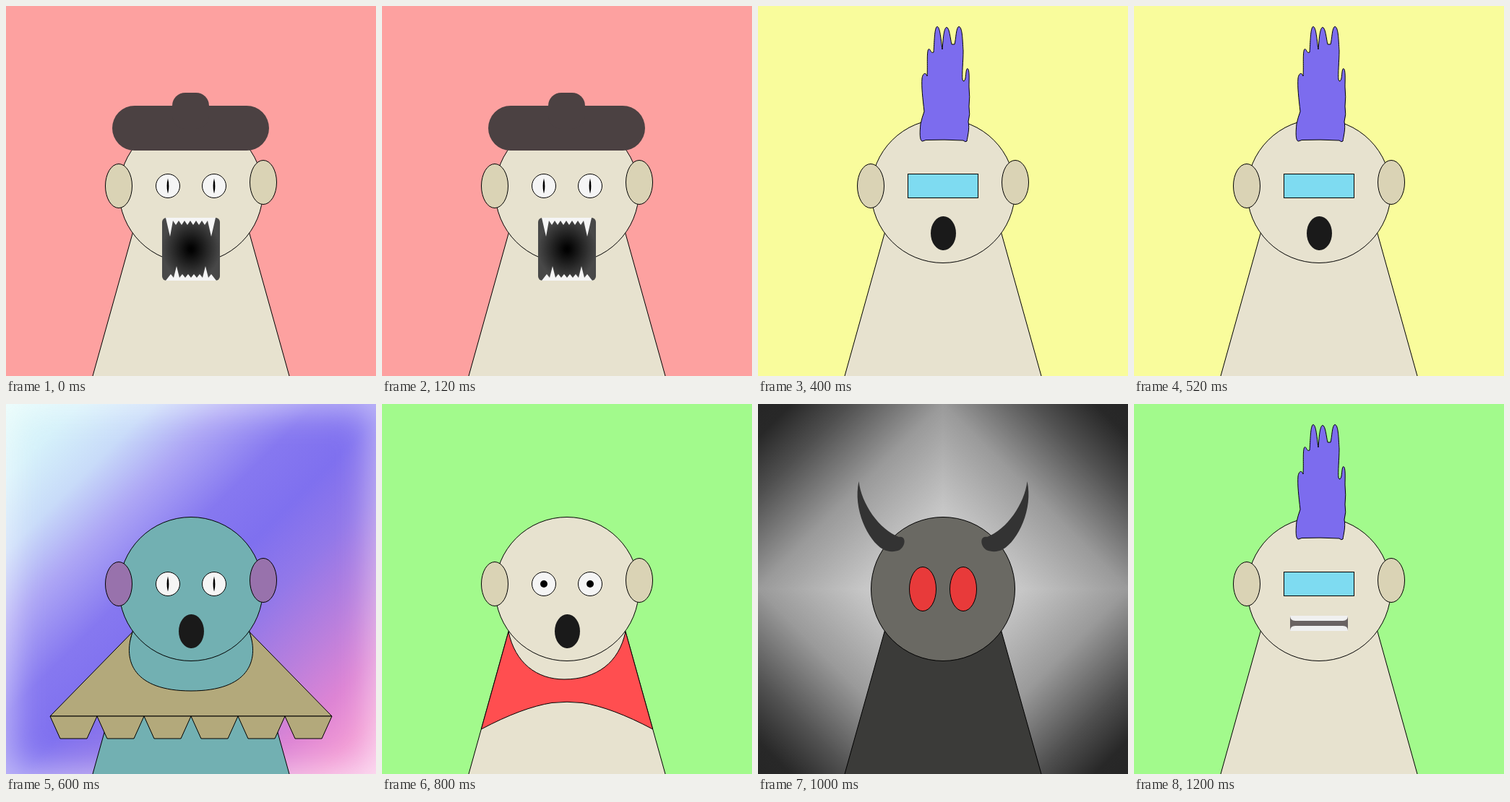
An HTML page for the animation above (1400 ms loop, 512 px wide and 512 px high).

```html
<!DOCTYPE html>
<html lang="en">
<head>
<meta charset="utf-8">
<title>Character parade</title>
<style>
  html, body { margin: 0; width: 100%; height: 100%; overflow: hidden; }
  svg { display: block; width: 100vw; height: 100vh; }

  .scene {
    --skin: #e7e2cf;
    --ear: #dad3b5;
    --body: var(--skin);
    visibility: hidden;
    animation: show 1400ms step-end calc(var(--n) * 200ms - 1400ms) infinite;
  }
  @keyframes show {
    0% { visibility: visible; }
    14.2857%, 100% { visibility: hidden; }
  }
  .teal { --skin: #72b0b2; --ear: #9872ac; }
  .demon { --skin: #6a6963; --body: #3b3b39; }

  .line { stroke: #000; stroke-width: 1; }
  .skin { fill: var(--skin); }
  .body { fill: var(--body); }
  .ear { fill: var(--ear); }
  .white { fill: #f5f5f5; }
  .cloth { fill: #b3a97b; }
  .felt { fill: #4b4142; }
</style>
</head>
<body>
<svg viewBox="0 0 512 512">
  <defs>
    <radialGradient id="throat">
      <stop offset="0"/>
      <stop offset=".1" stop-color="#040404"/>
      <stop offset="1" stop-color="#484848"/>
    </radialGradient>
    <linearGradient id="gloom" gradientUnits="userSpaceOnUse" x1="0" y1="0" x2="256" y2="256">
      <stop offset="0" stop-color="#262626"/>
      <stop offset=".09" stop-color="#282828"/>
      <stop offset=".25" stop-color="#505050"/>
      <stop offset=".5" stop-color="#9a9a9a"/>
      <stop offset=".78" stop-color="#c6c6c6"/>
      <stop offset="1" stop-color="#dcdcdc"/>
    </linearGradient>
    <linearGradient id="dusk" x1="0" y1="0" x2="1" y2="1">
      <stop offset="0" stop-color="#defaf9"/>
      <stop offset=".1" stop-color="#d5f1fa"/>
      <stop offset=".2" stop-color="#c8dbf9"/>
      <stop offset=".3" stop-color="#ada6f5"/>
      <stop offset=".42" stop-color="#8678f0"/>
      <stop offset=".52" stop-color="#7f70ef"/>
      <stop offset=".62" stop-color="#9278e9"/>
      <stop offset=".74" stop-color="#b97fdd"/>
      <stop offset=".84" stop-color="#dd84d4"/>
      <stop offset=".92" stop-color="#f098d4"/>
      <stop offset="1" stop-color="#f8b8e2"/>
    </linearGradient>
    <filter id="soft" filterUnits="userSpaceOnUse" x="-100" y="-100" width="712" height="712">
      <feGaussianBlur stdDeviation="24"/>
    </filter>

    <rect id="stage" width="512" height="512"/>
    <rect id="corner" width="256" height="256" fill="url(#gloom)"/>

    <path id="body" class="body line" d="M186.2 275 L119.7 513 H392.3 L325.8 275 Z"/>
    <circle id="skull" class="skin line" cx="256" cy="256" r="99.5"/>
    <g id="head">
      <use href="#skull"/>
      <ellipse class="ear line" cx="156" cy="249" rx="18.5" ry="30.5"/>
      <ellipse class="ear line" cx="356" cy="244" rx="18.5" ry="30.5"/>
    </g>

    <g id="dotEye">
      <circle class="white line" cx="224" cy="249" r="16.5"/>
      <circle cx="224" cy="249" r="5"/>
    </g>
    <g id="slitEye">
      <circle class="white line" cx="224" cy="249" r="16.5"/>
      <path d="M224 238.5 Q226.8 249 224 259.5 Q221.2 249 224 238.5 Z"/>
    </g>
    <g id="dotEyes"><use href="#dotEye"/><use href="#dotEye" x="64"/></g>
    <g id="slitEyes"><use href="#slitEye"/><use href="#slitEye" x="64"/></g>
    <rect id="visor" class="line" x="207.5" y="232.5" width="97" height="33" fill="#7edbf1"/>

    <ellipse id="gasp" cx="256.5" cy="314.5" rx="17.5" ry="23.5" fill="#1a1a1a"/>

    <g id="mohawk">
      <path class="line" fill="#7c6cee" d="M228 187 C223 188 224 172 225 163
        Q227 154 230 146 C228 128 226 112 227 100 C228 93 232 91 234 97
        C235 84 233 60 236.500 59.500 C239 60 239 66 243 64
        C244 52 244 29 248 28.500 C252 29 253 47 255 60
        C256 48 257 30 261 29.500 C265 30 266 45 268 53 H272
        C274 46 274 29 278 28.500 C283 29 283 48 284 62
        C284 76 282 94 283 102 Q285 107 287 100 C288 92 288 87 290 86.500
        C293 88 292 102 292 112 Q293.500 126 292 139 Q294 150 291 160
        C293 170 290 180 289 187 Q287 189 284 186 Q258 184.500 232 185.500 Z"/>
    </g>

    <g id="poncho" class="line cloth">
      <path d="M175 315.500 L61 432 H451 L337 315.500
        C351 356 335 397 256 397 C177 397 161 356 175 315.500 Z"/>
      <path id="tab" d="M61 432 L75 463 H112 L126 432 Z"/>
      <use href="#tab" x="65"/>
      <use href="#tab" x="130"/>
      <use href="#tab" x="195"/>
      <use href="#tab" x="260"/>
      <use href="#tab" x="325"/>
    </g>

    <path id="horn" fill="#333" d="M139.500 107 C143 138 168 174 195 184
      C205 182 205 196 196 202 C189 205 180 205 173 201
      C152 189 131 145 139.500 107 Z"/>
  </defs>

  <g class="scene" style="--n:0">
    <use href="#stage" fill="#fda1a0"/>
    <use href="#body"/>
    <use href="#head"/>
    <use href="#slitEyes"/>
    <rect x="216" y="293" width="80" height="87" rx="6" fill="url(#throat)"/>
    <path class="white" d="M221 293 L227 319 L231 297 l4 6 4-6 4 6 4-6 4 6 4-6 4 6 4-6 4 6 4-6 4 6 4-6 L284 319 L290 293 Z"/>
    <path class="white" d="M221 380 L228 371 L232 376 L236 360 L240 376 l4-5 4 5 4-5 4 5 4-5 4 5 4-5 4 5 L276 360 L280 376 L284 371 L291 380 Z"/>
    <rect class="felt" x="147" y="138" width="217" height="62" rx="31"/>
    <rect class="felt" x="230" y="120" width="51" height="50" rx="18"/>
  </g>

  <g class="scene teal" style="--n:1">
    <use href="#stage" fill="#f9fc9c"/>
    <use href="#body"/>
    <use href="#poncho"/>
    <use href="#head"/>
    <use href="#dotEyes"/>
    <rect x="216" y="293" width="80" height="16" rx="6" fill="url(#throat)"/>
    <path class="white" d="M221 293 L228 349 L231 297 l4 6 4-6 4 6 4-6 4 6 4-6 4 6 4-6 4 6 4-6 4 6 4-6 L284 349 L290 293 Z"/>
  </g>

  <g class="scene" style="--n:2">
    <use href="#stage" fill="#f9fc9c"/>
    <use href="#body"/>
    <use href="#head"/>
    <use href="#visor"/>
    <use href="#gasp"/>
    <use href="#mohawk"/>
  </g>

  <g class="scene teal" style="--n:3">
    <use href="#stage" fill="url(#dusk)"/>
    <rect x="-20" y="-20" width="552" height="552" fill="none" stroke="#fff" stroke-width="50" opacity=".55" filter="url(#soft)"/>
    <use href="#body"/>
    <use href="#poncho"/>
    <use href="#head"/>
    <use href="#slitEyes"/>
    <use href="#gasp"/>
  </g>

  <g class="scene" style="--n:4">
    <use href="#stage" fill="#a2fa8c"/>
    <use href="#body"/>
    <path class="line" fill="#ff4e50" d="M175 315 L137.300 450 Q194 420 235 413.500 Q256 411 277 413.500
      Q318 420 374.700 450 L337 315 C328 358 297 381 252 381 C214 381 184 358 175 315 Z"/>
    <use href="#head"/>
    <use href="#dotEyes"/>
    <use href="#gasp"/>
  </g>

  <g class="scene demon" style="--n:5">
    <use href="#corner"/>
    <use href="#corner" transform="rotate(90 256 256)"/>
    <use href="#corner" transform="rotate(180 256 256)"/>
    <use href="#corner" transform="rotate(270 256 256)"/>
    <use href="#body"/>
    <use href="#skull"/>
    <g class="line" fill="#e83a3a">
      <ellipse cx="228" cy="256" rx="18.5" ry="30.5"/>
      <ellipse cx="284" cy="256" rx="18.5" ry="30.5"/>
    </g>
    <use href="#horn"/>
    <use href="#horn" transform="matrix(-1 0 0 1 512 0)"/>
  </g>

  <g class="scene" style="--n:6">
    <use href="#stage" fill="#a2fa8c"/>
    <use href="#body"/>
    <use href="#head"/>
    <use href="#visor"/>
    <rect x="216" y="294" width="80" height="19" fill="#696262"/>
    <path fill="#f0f0f0" d="M216 293 H296 Q296 300 289 300 H223 Q216 300 216 293 Z
      M216 314 H296 Q296 307 289 307 H223 Q216 307 216 314 Z"/>
    <use href="#mohawk"/>
  </g>
</svg>
</body>
</html>
```
